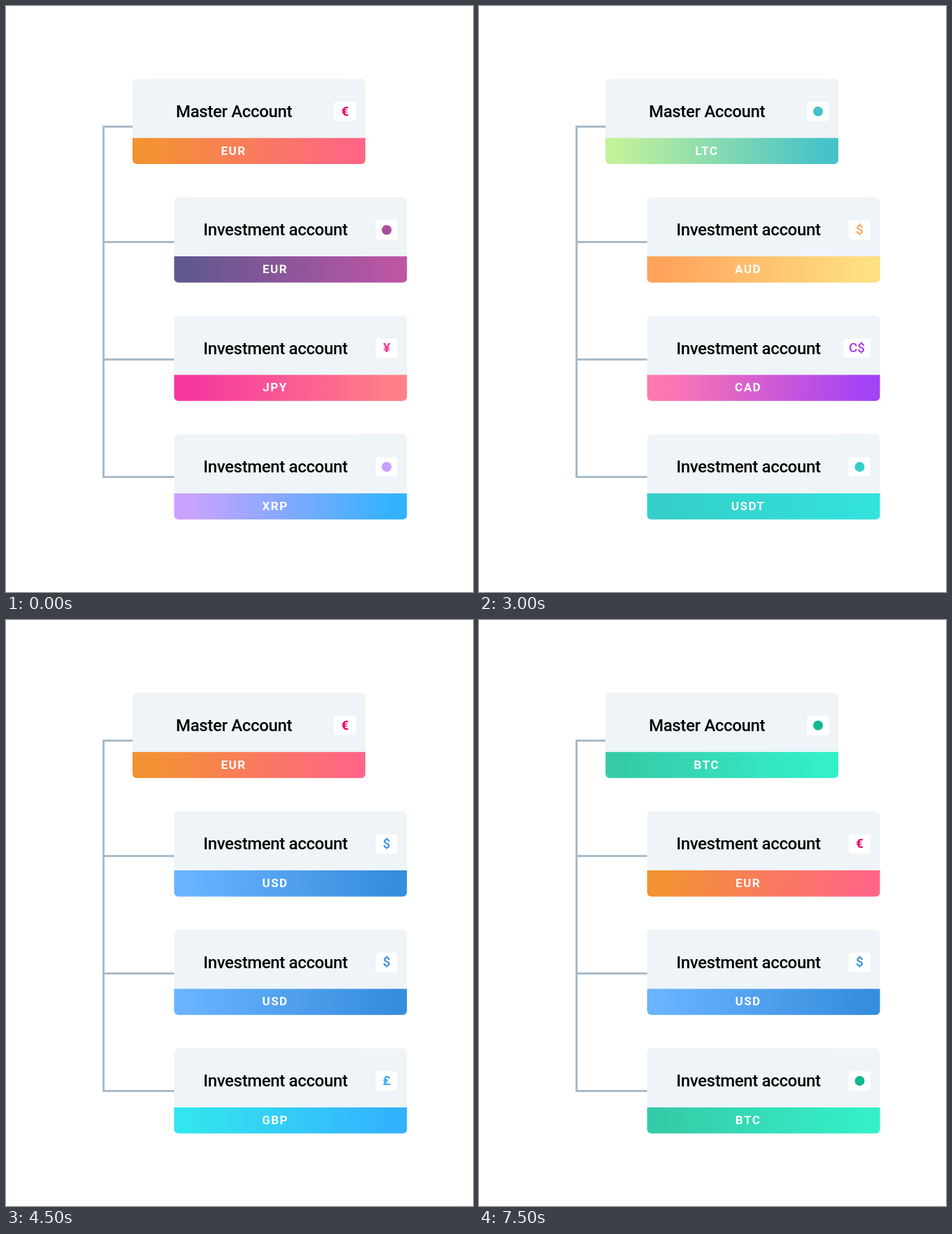
Recreate the animation shown at these times as an HTML page. Size 668 by 838 pixels, loop 9 s.

```html
<!DOCTYPE html>
<html lang="en">
<head>
<meta charset="utf-8">
<title>Accounts</title>
<style>
html, body { margin: 0; width: 100%; height: 100%; overflow: hidden; background: #fff; }
svg { display: block; width: 668px; height: 838px; font-family: Roboto, sans-serif; }
.name { font-size: 24px; font-weight: 500; letter-spacing: -.36px; }
.code { font-size: 17px; font-weight: 700; letter-spacing: 1.5px; fill: #fff; text-anchor: middle; }
.sign { font-size: 19px; text-anchor: middle; }
</style>
</head>
<body>
<svg id="stage" viewBox="0 0 668 838"></svg>
<script>
const HOLD = 1500;

// band start, band end, icon colour, sign (none: plain dot), sign weight
const currencies = {
  EUR: ['#f39232', '#ff6685', '#e30069', '€', 700],
  ETH: ['#62578f', '#bb55a4', '#a6509f'],
  JPY: ['#f5369f', '#ff8088', '#ef3a9b', '¥', 700],
  XRP: ['#cba2ff', '#33b2ff', '#c79ffc'],
  CAD: ['#ff78b0', '#a442f5', '#a63de8', 'C$', 500],
  USD: ['#69b3ff', '#368ddd', '#368ddd', '$', 500],
  GBP: ['#33e5ee', '#33b2ff', '#3ab0ea', '₤', 700],
  LTC: ['#c2f09b', '#46c2c8', '#46c2c8'],
  AUD: ['#ffa35c', '#ffe082', '#ffa256', '$', 500],
  USDT: ['#34cfc8', '#33e1dd', '#33cfc8'],
  BTC: ['#36cba8', '#33f0c8', '#12b890']
};
const labels = { ETH: 'EUR' };

const steps = [
  'EUR ETH JPY XRP',
  'CAD USD ETH GBP',
  'LTC AUD CAD USDT',
  'EUR USD USD GBP',
  'USD BTC LTC EUR',
  'BTC EUR USD BTC'
].map(s => s.split(' '));

const stage = document.getElementById('stage');

function gradient(key) {
  const [from, to] = currencies[key];
  return `<linearGradient id="${key}"><stop offset=".06" stop-color="${from}"/>` +
    `<stop offset=".94" stop-color="${to}"/></linearGradient>`;
}

function icon(key) {
  const [, , color, sign, weight] = currencies[key];
  const wide = sign === 'C$';
  const left = wide ? 280.5 : 288;
  const box = `<rect x="${left}" y="33" width="${319.5 - left}" height="27.5" rx="4" fill="#fff"/>`;
  const mark = sign
    ? `<text class="sign" x="${wide ? 300 : 304}" y="52.7" font-weight="${weight}" fill="${color}">${sign}</text>`
    : `<circle cx="304" cy="46.8" r="7" fill="${color}"/>`;
  return box + mark;
}

function card(key, i) {
  const x = i ? 240.5 : 181;
  const y = 104 + i * 169.4;
  return `<g transform="translate(${x} ${y})">
    <rect width="333" height="122" rx="6" fill="#eef4f7"/>
    <path d="M0 84.7H333V116a6 6 0 0 1-6 6H6a6 6 0 0 1-6-6Z" fill="url(#${key})"/>
    <text class="name" x="${i ? 41.8 : 62}" y="55">${i ? 'Investment account' : 'Master Account'}</text>
    <text class="code" x="144.6" y="108.7">${labels[key] || key}</text>
    ${icon(key)}</g>`;
}

stage.innerHTML = `<defs>${Object.keys(currencies).map(gradient).join('')}</defs>
  <path d="M181 172.4H139.5V673.4H241M139.5 337.5H241M139.5 505.4H241" fill="none" stroke="#a8bbcb" stroke-width="3"/>
  <g id="cards"></g>`;
const cards = document.getElementById('cards');

let shown = -1;
function draw(time) {
  const step = Math.floor(time / HOLD) % steps.length;
  if (step !== shown) {
    shown = step;
    cards.innerHTML = steps[step].map(card).join('');
  }
}

let start;
function tick(now) {
  start ??= now;
  draw(now - start);
  requestAnimationFrame(tick);
}
draw(0);
requestAnimationFrame(tick);
</script>
</body>
</html>
```
